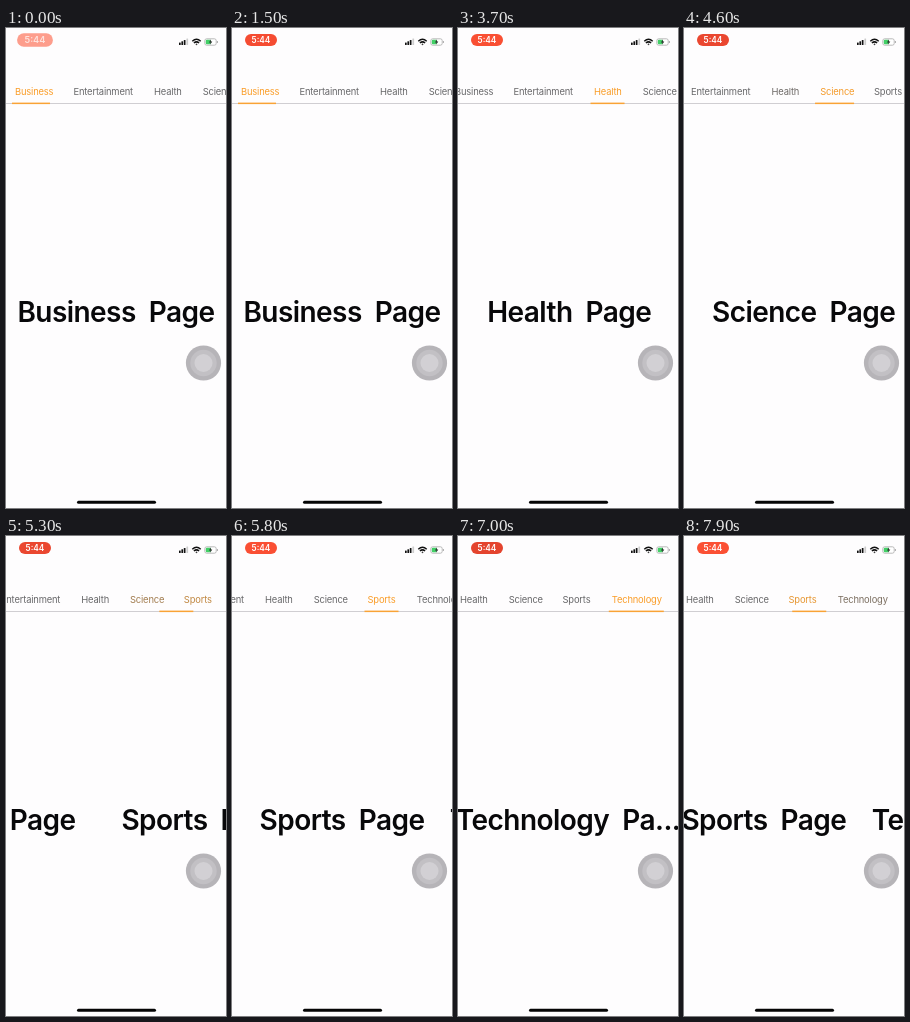
An HTML page that plays this animation: 220 by 480 pixels, repeating every 8 s.

```html
<!DOCTYPE html>
<html lang="en">
<head>
<meta charset="utf-8">
<title>Swipeable tabs</title>
<style>
  html, body { margin: 0; width: 100%; height: 100%; overflow: hidden; background: #fefdfe; }
  svg { display: block; width: 220px; height: 480px; font-family: Inter, "Noto Sans", sans-serif; }
  text { white-space: pre; }
  #pages { font-size: 28px; font-weight: 600; letter-spacing: -.55px; text-anchor: middle; fill: #08080a; }
  #tabs { font-size: 9.4px; letter-spacing: -.18px; }
</style>
</head>
<body>
<svg viewBox="0 0 220 480">
  <rect width="220" height="480" fill="#fefdfe"/>
  <g id="pages"></g>
  <path d="M0 75.5H220" stroke="#d0ced2"/>
  <g id="tabs"></g>
  <rect id="line" y="74.6" height="1.5" fill="#f9a336"/>

  <g id="pill">
    <rect id="pillBox" x="13" y="6" width="32" height="12" rx="6"/>
    <text id="clock" x="29" y="15" font-size="8.3" font-weight="600" fill="#fff" text-anchor="middle">5:44</text>
  </g>
  <g fill="#111">
    <rect x="173" y="14.5" width="1.7" height="2.5" rx=".5"/>
    <rect x="175.4" y="13.3" width="1.7" height="3.7" rx=".5"/>
    <rect x="177.8" y="12" width="1.7" height="5" rx=".5"/>
    <rect x="180.4" y="10.6" width="1.7" height="6.4" rx=".5" fill="#ccc"/>
  </g>
  <g fill="none" stroke="#111" stroke-width="1.5">
    <path d="M186.3 13.2Q190.5 9.4 194.7 13.2M187.9 15Q190.5 12.7 193.1 15"/>
    <circle cx="190.5" cy="16.3" r=".4" stroke-width="1"/>
  </g>
  <rect x="198.8" y="10.8" width="11.4" height="6.4" rx="1.8" fill="#fff" stroke="#aaa" stroke-width=".8"/>
  <rect x="199.8" y="11.8" width="5" height="4.4" rx="1" fill="#43cf67"/>
  <path d="M205 11.3L203 14.4H204.6L204.1 16.8L206.3 13.6H204.7Z" fill="#222"/>
  <path d="M211.4 13V15" stroke="#aaa"/>

  <circle cx="197.5" cy="335" r="17.6" fill="#b6b4b8"/>
  <circle cx="197.5" cy="335" r="13.2" fill="#c2c0c4"/>
  <circle cx="197.5" cy="335" r="9" fill="#d2d0d4"/>
  <rect x="71" y="472.7" width="79" height="3" rx="1.5" fill="#050505"/>
</svg>
<script>
const LOOP = 8000, WIDTH = 220, SWIPE = 700, PULSE = 2050;
// label, page title, tab left, underline width, tab bar scroll when active
const tabs = [
  ['Business', 'Business  Page', 9, 38, 0],
  ['Entertainment', 'Entertainment...', 67.5, 65, 0],
  ['Health', 'Health  Page', 148, 34, 12],
  ['Science', 'Science  Page', 196.7, 39, 60.5],
  ['Sports', 'Sports  Page', 250.5, 34, 115],
  ['Technology', 'Technology  Pa...', 299.8, 55, 146]
].map(([label, title, x, width, scroll]) => ({ label, title, x, width, scroll }));
// start time, destination page
const swipes = [[2100, 1], [3100, 2], [4100, 3], [5050, 4], [6150, 5], [7500, 4]];
const GREY = [104, 104, 106], ORANGE = [250, 157, 40];
const RED = [252, 80, 52], DARK_RED = [228, 68, 46], PINK = [253, 157, 140];

const $ = id => document.getElementById(id);
const clamp = v => Math.min(1, Math.max(0, v));
const lerp = (a, b, u) => a + (b - a) * u;
const mix = (a, b, u) => a.map((v, i) => Math.round(lerp(v, b[i], u)));
const glide = u => 1 - (1 - u ** 1.3) ** 3;

function addText(parent, content, x, y) {
  const el = document.createElementNS('http://www.w3.org/2000/svg', 'text');
  el.textContent = content;
  el.setAttribute('x', x);
  el.setAttribute('y', y);
  return parent.appendChild(el);
}

tabs.forEach((tab, i) => {
  addText($('pages'), tab.title, 110 + i * WIDTH, 293.5);
  tab.el = addText($('tabs'), tab.label, tab.x, 67.3);
});

function draw(t) {
  let page = 0, scroll = 0;
  for (const [start, to] of swipes) {
    if (t < start) break;
    const u = glide(clamp((t - start) / SWIPE));
    page = lerp(page, to, u);
    // the bar only moves when the next tab lies too far right
    scroll = lerp(scroll, Math.max(scroll, tabs[to].scroll), clamp((u - .5) / .45));
  }
  $('pages').setAttribute('transform', `translate(${-page * WIDTH})`);
  $('tabs').setAttribute('transform', `translate(${-scroll})`);
  tabs.forEach((tab, i) =>
    tab.el.setAttribute('fill', `rgb(${mix(GREY, ORANGE, clamp(1 - Math.abs(page - i)))})`));

  const i = Math.min(Math.floor(page), tabs.length - 2);
  $('line').setAttribute('x', lerp(tabs[i].x, tabs[i + 1].x, page - i) - 3 - scroll);
  $('line').setAttribute('width', tabs[Math.round(page)].width);

  const glow = 1 - clamp(t / 600);
  const dim = .5 + .5 * Math.cos((t - 2900) / PULSE * 2 * Math.PI);
  $('pillBox').setAttribute('fill', `rgb(${mix(mix(RED, DARK_RED, dim), PINK, glow)})`);
  $('clock').setAttribute('opacity', 1 - glow * .3);
  $('pill').setAttribute('transform', `translate(29 12) scale(${1 + glow * .12}) translate(-29 -12)`);
}

function tick() {
  draw(performance.now() % LOOP);
  requestAnimationFrame(tick);
}
tick();
</script>
</body>
</html>
```
